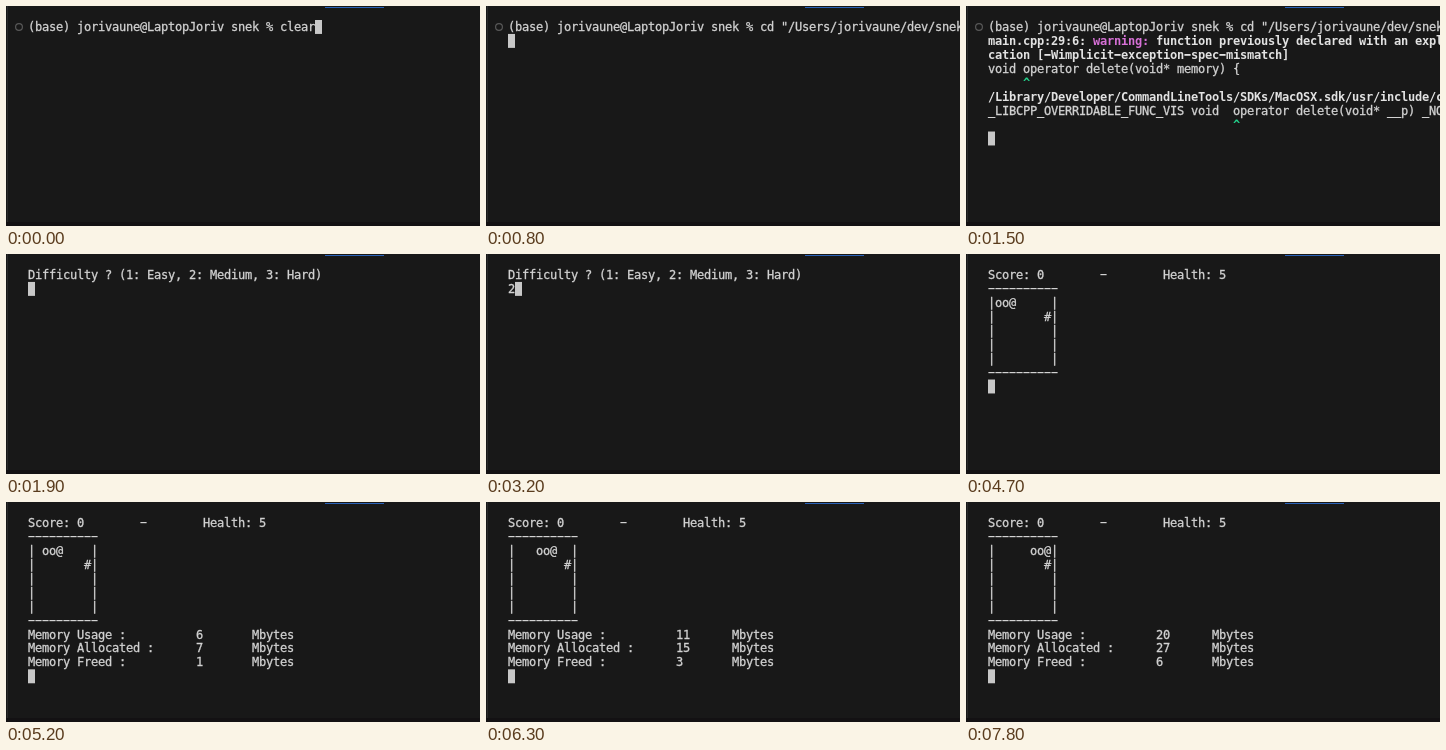
Animation of 474x220 px, one loop 8000 ms. Source, as an HTML page with a canvas:

```html
<!DOCTYPE html>
<html lang="en">
<head>
<meta charset="utf-8">
<title>Terminal snake</title>
<style>
  html, body { margin: 0; width: 100%; height: 100%; overflow: hidden; background: #181818; }
  canvas { display: block; }
</style>
</head>
<body>
<canvas id="stage" width="474" height="220"></canvas>
<script>
const ctx = document.getElementById('stage').getContext('2d');
const LOOP = 8000;
const LEFT = 22, TOP = 14, CELL_W = 7, CELL_H = 13.94, BASELINE = 11;
const FONT = '12px "DejaVu Sans Mono", monospace';
const TEXT = '#d2d2d2', BRIGHT = '#e2e2e2', MAGENTA = '#d670d6', GREEN = '#23d18b';

const PROMPT = '(base) jorivaune@LaptopJoriv snek % ';
const COMMAND = PROMPT + 'cd "/Users/jorivaune/dev/snek/" && make';
const QUESTION = 'Difficulty ? (1: Easy, 2: Medium, 3: Hard)';

function write(row, col, text, color = TEXT, bold = false) {
  const y = TOP + row * CELL_H + BASELINE;
  ctx.font = (bold ? 'bold ' : '') + FONT;
  ctx.fillStyle = ctx.strokeStyle = color;
  ctx.lineWidth = 0.3;
  [...text].forEach((ch, i) => {
    const x = LEFT + (col + i) * CELL_W;
    if (ch === ' ') return;
    if (ch === '-') {
      // The terminal face has a wide hyphen.
      ctx.fillRect(x + 0.4, Math.round(y) - 5, CELL_W - 0.8, bold ? 1.8 : 1.2);
      return;
    }
    ctx.fillText(ch, x, y);
    if (!bold) ctx.strokeText(ch, x, y);
  });
}

function cursor(row, col) {
  ctx.fillStyle = '#c8c8c8';
  ctx.fillRect(LEFT + col * CELL_W, TOP + row * CELL_H, CELL_W, CELL_H);
}

function drawFrame() {
  ctx.fillStyle = '#181818';
  ctx.fillRect(0, 0, 474, 220);
  ctx.fillStyle = '#2a2a2a';
  ctx.fillRect(1, 0, 1, 216);
  ctx.fillStyle = '#131113';
  ctx.fillRect(0, 216, 474, 4);
  ctx.fillStyle = '#2a62b8';
  ctx.fillRect(319, 1, 59, 1);
}

function drawShell(t) {
  ctx.strokeStyle = '#585858';
  ctx.lineWidth = 1.2;
  ctx.beginPath();
  ctx.arc(13, 21, 3.4, 0, Math.PI * 2);
  ctx.stroke();

  if (t < 200) {
    const line = PROMPT + (t < 100 ? 'clear' : '');
    write(0, 0, line);
    cursor(0, line.length);
    return;
  }
  write(0, 0, COMMAND);
  if (t < 1500) {
    if (t >= 700) cursor(1, 0);
    return;
  }
  drawWarning();
  const done = t >= 1800;
  if (done) write(8, 0, '1 warning generated.');
  cursor(done ? 9 : 8, 0);
}

function drawWarning() {
  write(1, 0, 'main.cpp:29:6:', BRIGHT, true);
  write(1, 15, 'warning:', MAGENTA, true);
  write(1, 24, 'function previously declared with an explicit', BRIGHT, true);
  write(2, 0, 'cation [-Wimplicit-exception-spec-mismatch]', BRIGHT, true);
  write(3, 0, 'void operator delete(void* memory) {');
  write(4, 5, '^', GREEN, true);
  write(5, 0, '/Library/Developer/CommandLineTools/SDKs/MacOSX.sdk/usr/include/c++', BRIGHT, true);
  write(6, 0, '_LIBCPP_OVERRIDABLE_FUNC_VIS void  operator delete(void* __p) _NOEXCEPT');
  write(7, 35, '^', GREEN, true);
}

function drawQuestion(t) {
  const answer = t >= 4400 ? '1' : t >= 3200 && t < 4200 ? '2' : '';
  write(0, 0, QUESTION);
  write(1, 0, answer);
  cursor(1, answer.length);
}

function drawGame(t) {
  const turn = [5200, 5700, 6300, 6800, 7300, 7700].filter(start => t >= start).length;

  write(0, 0, 'Score: 0');
  write(0, 16, '-');
  write(0, 25, 'Health: 5');
  for (const row of [1, 7]) write(row, 0, '-'.repeat(10));
  for (let row = 2; row < 7; row++) write(row, 0, '|        |');
  write(2, 1 + Math.min(turn, 5), 'oo@');
  write(3, 8, '#');

  if (!turn) return cursor(8, 0);
  const stats = [
    ['Usage', Math.floor(2.8 * turn + 3.4)],
    ['Allocated', 4 * turn + 3],
    ['Freed', turn]
  ];
  stats.forEach(([label, value], i) => {
    write(8 + i, 0, `Memory ${label} :`);
    write(8 + i, 24, String(value));
    write(8 + i, 32, 'Mbytes');
  });
  const key = t >= 7500 && t < 7700 ? 's' : '';
  write(11, 0, key);
  cursor(11, key.length);
}

function render(now) {
  const t = now % LOOP;
  drawFrame();
  if (t < 1900) drawShell(t);
  else if (t < 4700) drawQuestion(t);
  else drawGame(t);
  requestAnimationFrame(render);
}

render(0);
</script>
</body>
</html>
```
